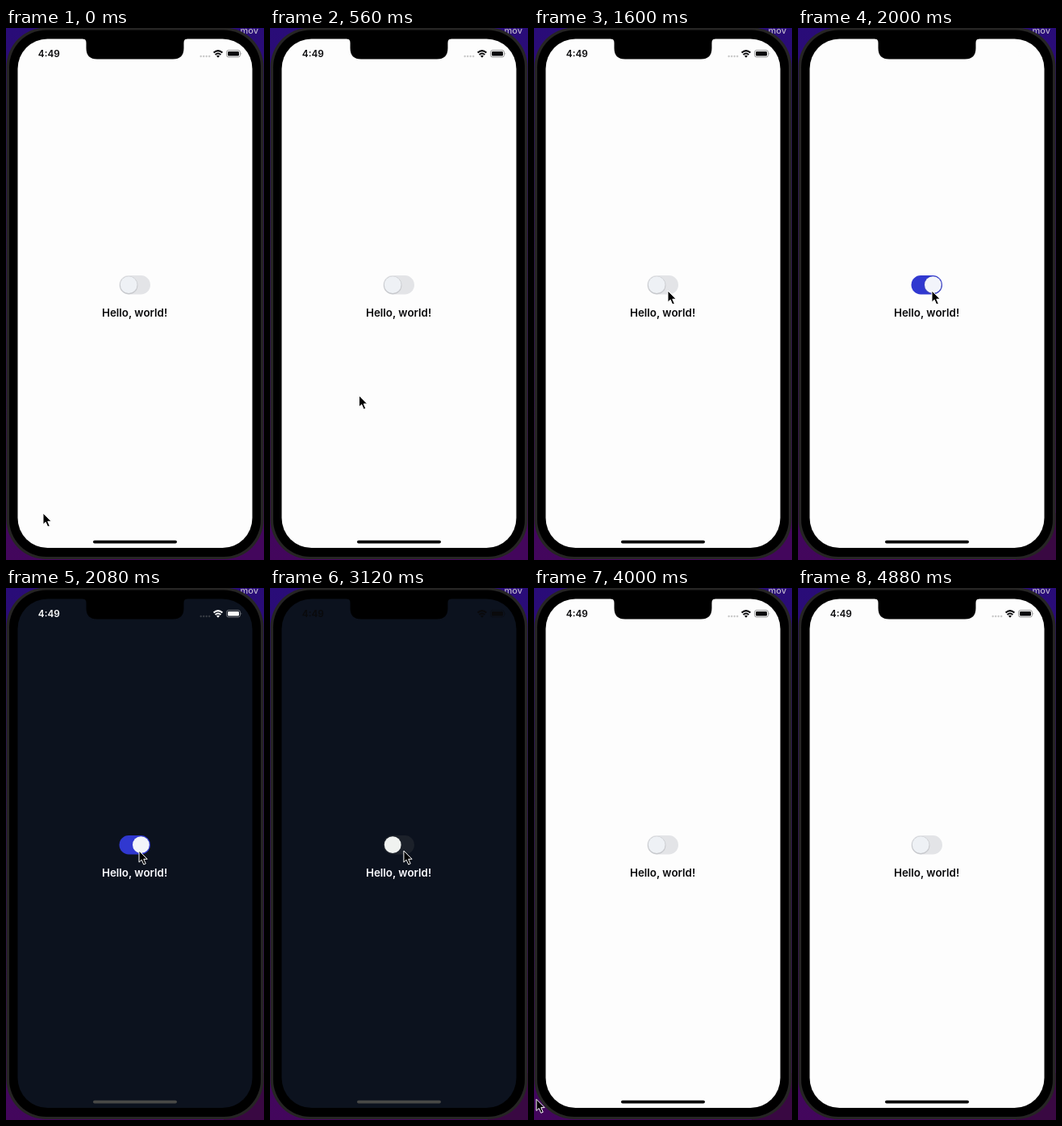
Recreate the animation shown at these times as an HTML page. Size 320x658 px, loop 4.96 s.

```html
<!DOCTYPE html>
<html lang="en">
<meta charset="utf-8">
<title>Dark mode toggle</title>
<style>
  html, body { margin: 0; width: 100%; height: 100%; overflow: hidden; background: #000; }
  svg { display: block; width: 320px; height: 658px; font-family: Inter, sans-serif; font-weight: 600; }
  svg { --ink: #0a0a0c; --paper: #fdfdfd; --home: #050505; --status: #0a0a0c; --dots: #c8c8c8; }
  svg.dark { --ink: #fafaff; --paper: #0c121e; --home: #484846; --dots: #383c44; }
</style>
<svg id="stage" viewBox="0 0 320 658">
  <defs>
    <linearGradient id="desk" x2="0" y2="1">
      <stop stop-color="#290c78"/><stop offset="1" stop-color="#43065c"/>
    </linearGradient>
  </defs>

  <rect width="320" height="658" fill="url(#desk)"/>
  <rect id="corner" x="270" y="600" width="50" height="58"/>
  <text x="290.5" y="6.5" font-size="11" font-weight="500" fill="#bdb6cc">mov</text>

  <!-- phone -->
  <rect x=".5" y="-.5" width="319" height="657.5" rx="49" fill="#262524"/>
  <rect x="4" y="2.5" width="312" height="651.5" rx="46" fill="#000"/>
  <rect x="14.5" y="13.5" width="291" height="629.5" rx="37" fill="var(--paper)"/>
  <path d="M95.5 13V13.5q4 0 4 5v6.5q0 13.5 13.5 13.5h94q13.5 0 13.5-13.5v-6.5q0-5 4-5v-.5z"/>
  <rect x="108" y="633.7" width="104" height="3.8" rx="1.9" fill="var(--home)"/>

  <!-- status bar -->
  <g fill="var(--status)">
    <text x="39.8" y="36.2" font-size="11.8">4:49</text>
    <path d="M257.6 30.6q5.4-5 10.8 0M259.6 33q3.4-3 6.8 0" fill="none" stroke="var(--status)" stroke-width="2"/>
    <path d="M261 34.6q2-1.6 4 0l-2 2.2z"/>
    <rect x="273.5" y="27.5" width="17" height="8.5" rx="2.6" fill="none" stroke="var(--status)" opacity=".4"/>
    <rect x="275" y="29" width="14" height="5.6" rx="1.4"/>
    <path d="M291.6 30.3q1.4 1.4 0 2.9z" opacity=".5"/>
  </g>
  <g id="dots" fill="var(--dots)">
    <circle cx="241.7" cy="35" r="1.2"/><circle cx="245.2" cy="35" r="1.2"/>
    <circle cx="248.7" cy="35" r="1.2"/><circle cx="252.2" cy="35" r="1.2"/>
  </g>

  <!-- content -->
  <rect id="track" x="140.5" y="306" width="38.5" height="23.5" rx="11.75"/>
  <circle id="shade" cy="318.2" r="11.2" fill="#70747c"/>
  <circle id="knob" cy="317.7" r="10.4"/>
  <text x="159.6" y="357" font-size="13.4" text-anchor="middle" fill="var(--ink)">Hello, world!</text>

  <path id="cursor" d="M0 0V14.2L3.2 11.2 5.8 17 8.3 15.9 5.8 10.3H10.2Z" stroke="#fff" stroke-linejoin="round"/>
</svg>
<script>
  const LOOP = 4960, STEP = 80;
  const $ = id => document.getElementById(id);
  const lerp = (a, b, p) => a + (b - a) * p;
  const ease = (t, from, to) => {
    const p = Math.min(1, Math.max(0, (t - from) / (to - from)));
    return p * p * (3 - 2 * p);
  };
  const mix = (a, b, p) => `rgb(${a.map((v, i) => Math.round(lerp(v, b[i], p)))})`;

  // Cursor moves: [start, end, x, y]
  const moves = [
    [80, 1000, 167, 327],
    [1040, 1280, 166, 325],
    [2000, 2080, 165, 325],
    [2800, 3200, 166, 325],
    [3360, 4160, -16, 668]
  ];

  function cursorAt(t) {
    let x = 46, y = 600;
    for (const [from, to, nx, ny] of moves) {
      const p = ease(t, from, to);
      x = lerp(x, nx, p);
      y = lerp(y, ny, p);
    }
    return `translate(${x} ${y})`;
  }

  function draw(t) {
    const dark = t >= 2080 && t < 3200;
    const whiteStatus = t >= 2000 && t < 3120;
    const on = ease(t, 1720, 1980) - ease(t, 2840, 3100);
    const x = lerp(152.2, 167.4, on);
    const trackOff = dark ? [28, 33, 42] : [227, 228, 231];
    const knobOff = dark ? [240, 242, 240] : [238, 241, 245];

    $('stage').classList.toggle('dark', dark);
    $('stage').style.setProperty('--status', whiteStatus ? '#fdfdfd' : '#0a0a0c');
    $('dots').style.opacity = whiteStatus === dark ? 1 : 0;
    $('corner').setAttribute('fill', t < 1760 ? '#43065c' : '#390842');
    $('track').setAttribute('fill', mix(trackOff, [48, 56, 208], on));
    $('shade').setAttribute('cx', x);
    $('shade').style.opacity = dark ? 0 : .25;
    $('knob').setAttribute('cx', x);
    $('knob').setAttribute('fill', mix(knobOff, [242, 244, 250], on));
    $('cursor').setAttribute('transform', cursorAt(t));
  }

  function tick(now) {
    draw(Math.floor(now % LOOP / STEP) * STEP);
    requestAnimationFrame(tick);
  }
  draw(0);
  requestAnimationFrame(tick);
</script>
</html>
```
